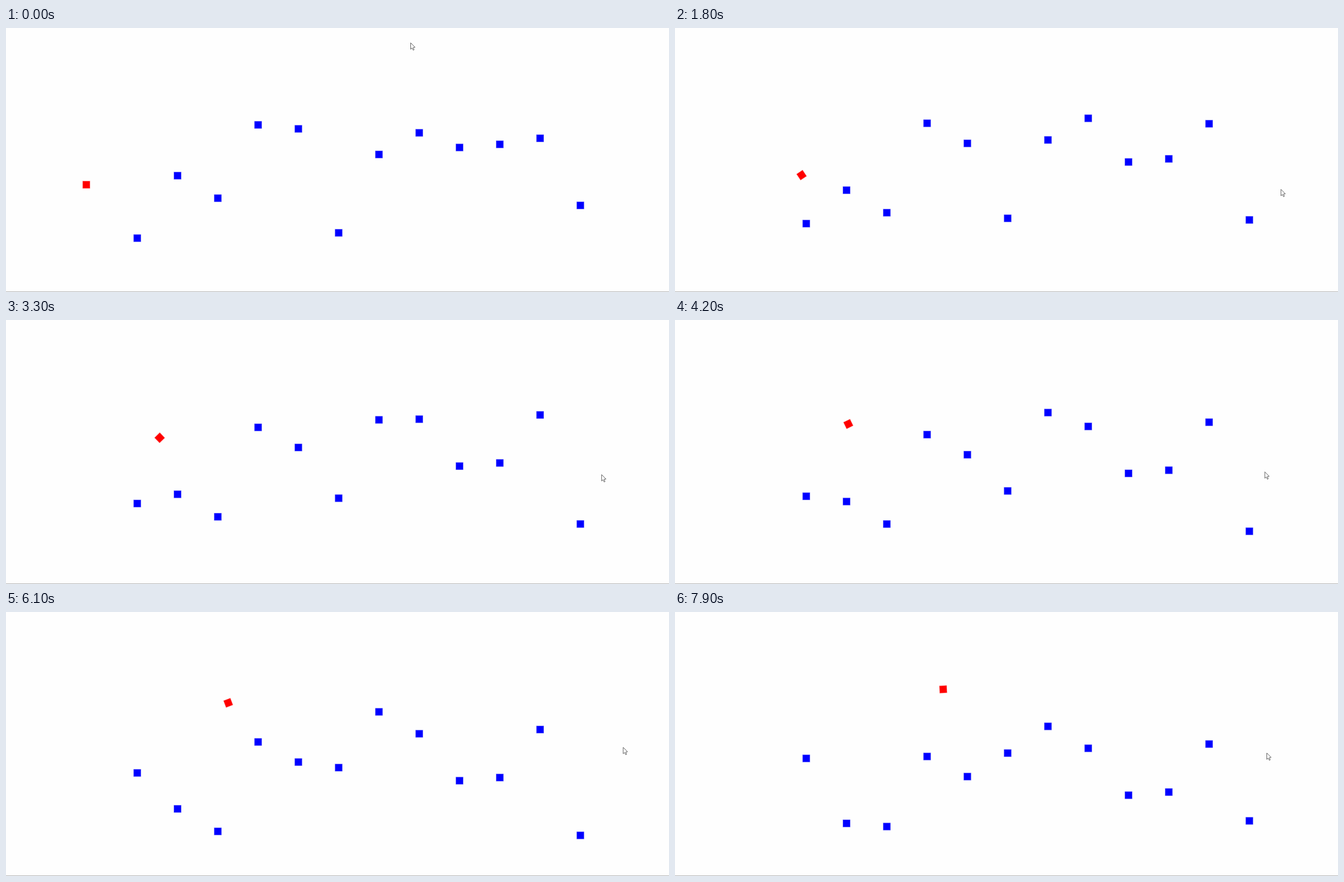
Animation of 1187x472 px, one loop 8000 ms. Source, as an HTML page with a canvas:

```html
<!DOCTYPE html>
<html lang="en">
<head>
<meta charset="utf-8">
<title>Bouncing blocks</title>
<style>
html, body { margin: 0; width: 100%; height: 100%; overflow: hidden; background: #fefefe; }
canvas { display: block; }
</style>
</head>
<body>
<canvas id="stage" width="1187" height="472"></canvas>
<script>
const ctx = document.getElementById('stage').getContext('2d');
const LOOP = 8000, TICK = 100, SIZE = 13;
const UNIT = 1.4424;            // one game pixel; blocks drift this far per tick
const GAP = 50 * UNIT, TOP = 159.7, FLOOR = 400.82;
const SPEED = 47.9;             // runner, px per second

// Starting heights from left to right; negative means the block sets off upwards
const starts = [-375.7, 264, 304.25, -173.2, 180.3, -366.2,
  -226.1, -187.4, 213.6, 208, -197.15, 317.15];

// Steering of the runner: from, to (seconds), degrees per second
const turns = [[0.55, 2.55, -27], [2.8, 5, 20], [5.6, 6, -27], [7, 8, 20]];

// Pointer stops: seconds, x, y
const stops = [
  [0, 724.5, 26.5], [1, 627.5, 292.5], [2, 1138, 288], [2.5, 1075, 280.5],
  [4.2, 1056, 271.5], [5.4, 1125, 223.5], [6.9, 1080.5, 264.5], [7.9, 1059.5, 252]
];

const clamp = (v, lo, hi) => Math.min(hi, Math.max(lo, v));
const mix = (a, b, k) => a + (b - a) * k;
const ease = k => k * k * (3 - 2 * k);

// Slightly soft edge: a half-transparent rim around a solid core
function square(x, y, angle, color) {
  ctx.save();
  ctx.translate(x, y);
  ctx.rotate(angle);
  ctx.fillStyle = color;
  for (const [side, alpha] of [[SIZE + 0.7, 0.5], [SIZE - 0.7, 1]]) {
    ctx.globalAlpha = alpha;
    ctx.fillRect(-side / 2, -side / 2, side, side);
  }
  ctx.restore();
}

// A block turns round on the first tick that carries it past the edge
function blockY(start, t) {
  const y = Math.abs(start), dir = Math.sign(start);
  const ticks = t * 1000 / TICK;
  const turn = Math.ceil((dir < 0 ? y - TOP : FLOOR - y) / UNIT);
  return y + dir * UNIT * (turn - Math.abs(turn - ticks));
}

function heading(t) {
  const deg = turns.reduce((sum, [from, to, rate]) =>
    sum + rate * clamp(t - from, 0, to - from), 0);
  return deg * Math.PI / 180;
}

function drawRunner(t) {
  const dt = 0.02, count = Math.round(t / dt);
  let x = 143.8, y = 280.2;
  for (let i = 0; i < count; i++) {
    const a = heading((i + 0.5) * dt);
    x += SPEED * dt * Math.cos(a);
    y += SPEED * dt * Math.sin(a);
  }
  square(x, y, heading(t), '#f00');
}

function drawPointer(t) {
  const i = Math.max(1, stops.findIndex(s => s[0] >= t));
  const [a, b] = [stops[i - 1], stops[i]];
  const k = ease((t - a[0]) / (b[0] - a[0]));
  ctx.save();
  ctx.translate(mix(a[1], b[1], k), mix(a[2], b[2], k));
  ctx.fillStyle = '#fff';
  ctx.strokeStyle = '#5c5c5c';
  const arrow = new Path2D('M0 0V11.5L2.6 9.2 4.5 13.2 6.2 12.4 4.5 8.4 7.8 8Z');
  ctx.fill(arrow);
  ctx.stroke(arrow);
  ctx.restore();
}

function draw(now) {
  const t = Math.floor(now % LOOP / TICK) * TICK / 1000;
  ctx.fillStyle = '#fefefe';
  ctx.fillRect(0, 0, 1187, 472);
  ctx.fillStyle = '#b4b4b4';
  ctx.fillRect(0, 471, 1187, 1);
  starts.forEach((s, i) => square(235 + i * GAP, blockY(s, t), 0, '#00f'));
  drawRunner(t);
  drawPointer(t);
}

const begin = performance.now();
function tick() {
  draw(performance.now() - begin);
  requestAnimationFrame(tick);
}
tick();
</script>
</body>
</html>
```
